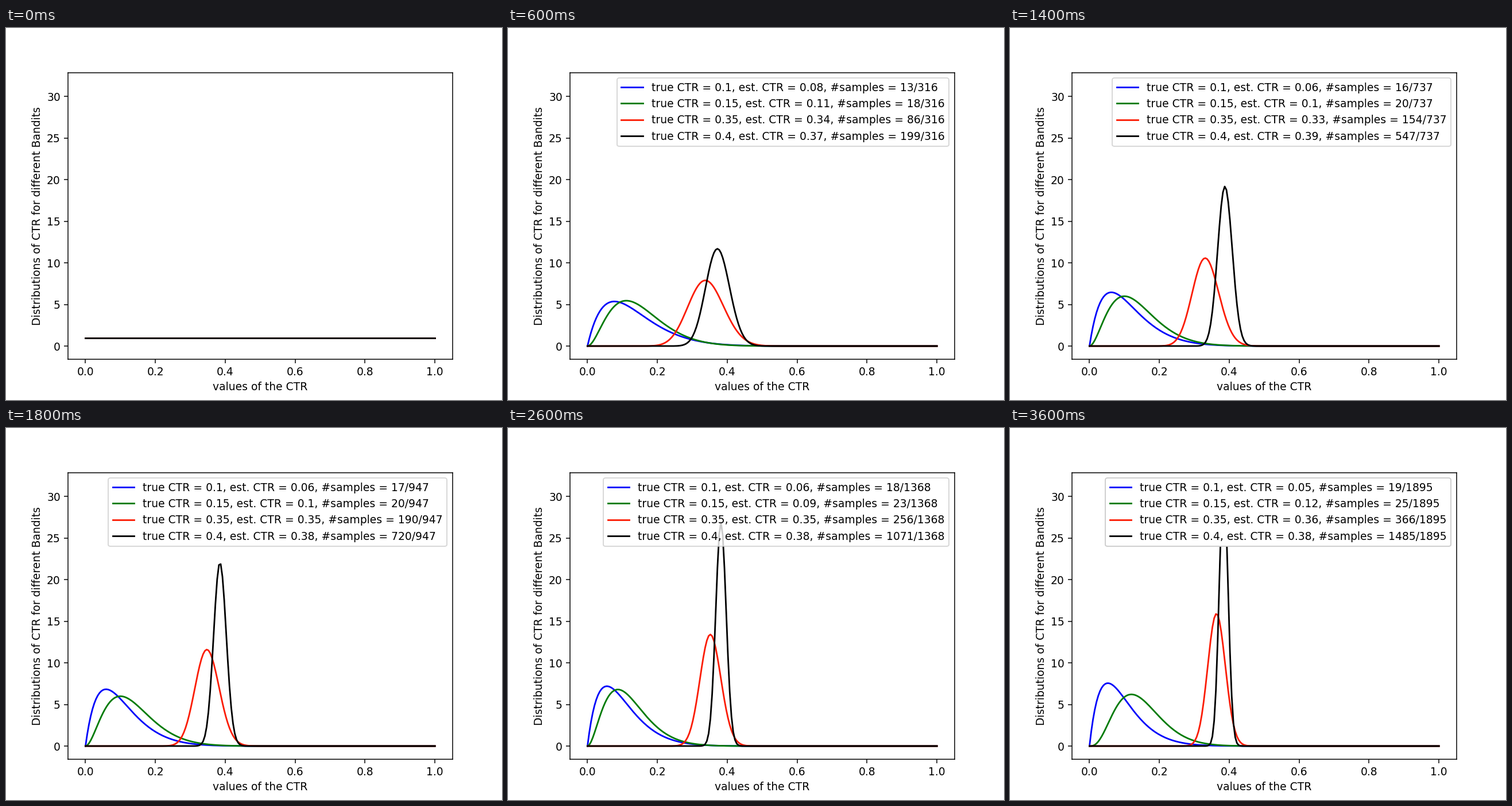
Write a matplotlib script that moves like this. It is 864x648 px and loops after 4000 ms.

```python
import math

import numpy as np
import matplotlib.pyplot as plt
from matplotlib.animation import FuncAnimation

STEP_MS = 200
SLOTS = 20
LAST = 18            # the final state holds for two slots
PEAK = 31.28
RATES = (0.1, 0.15, 0.35, 0.4)
COLORS = ("#0004fb", "#007b06", "#fb1c04", "black")

# Trials and clicks of the slow bandits, one value per step.
BLUE_N = (0, 9, 11, 13, 14, 15, 15, 16, 17, 17, 17, 17, 17, 18, 18, 18, 18, 18, 19)
GREEN_N = (0, 14, 16, 18, 19, 19, 20, 20, 20, 20, 20, 21, 22, 23, 23, 24, 24, 25, 25)

# Checkpoints of the two strong bandits.
KEYS = (0, 1, 2, 4, 7, 11, 15, 18)
RED_N = (0, 13, 50, 123, 154, 227, 284, 366)
RED_S = (0, 2, 16, 42, 51, 81, 100, 133)
BLACK_S = (0, 26, 50, 98, 212, 342, 476, 570)

x = np.linspace(0, 1, 200)
log_x = np.log(np.maximum(x, 1e-300))
log_1x = np.log(np.maximum(1 - x, 1e-300))


def at(step, values):
    return int(round(float(np.interp(step, KEYS, values))))


def counts(step):
    """Return (trials, clicks) for each bandit and the total of trials."""
    total = round(2000 * step / 19)
    blue = (BLUE_N[step], int(step > 1))
    green = (GREEN_N[step], 0 if step == 0 else 2 if step < 15 else 3)
    red = (at(step, RED_N), at(step, RED_S))
    black = (total - blue[0] - green[0] - red[0], at(step, BLACK_S))
    return (blue, green, red, black), total


def beta_pdf(n, s):
    norm = math.lgamma(n + 2) - math.lgamma(s + 1) - math.lgamma(n - s + 1)
    return np.exp(norm + s * log_x + (n - s) * log_1x)


fig, ax = plt.subplots(figsize=(6.4, 4.8), dpi=135)
ax.set_xlim(-0.05, 1.05)
ax.set_ylim(-0.05 * PEAK, 1.05 * PEAK)
ax.set_xlabel("values of the CTR")
ax.set_ylabel("Distributions of CTR for different Bandits")
lines = [ax.plot(x, np.ones_like(x), color=c, lw=1.5)[0] for c in COLORS]


def update(frame):
    step = min(frame, LAST)
    arms, total = counts(step)
    for line, rate, (n, s) in zip(lines, RATES, arms):
        line.set_ydata(beta_pdf(n, s))
        est = round(s / n, 2) if n else 0.0
        line.set_label(f"true CTR = {rate}, est. CTR = {est}, #samples = {n}/{total}")
    legend = ax.legend(loc="upper right")
    legend.set_visible(step > 0)
    if step == LAST:
        legend.get_frame().set_facecolor((1, 1, 1, 1))
        legend.get_frame().set_alpha(None)
    return lines


anim = FuncAnimation(fig, update, frames=SLOTS, interval=STEP_MS,
                     init_func=lambda: update(0), repeat=True, repeat_delay=0)
plt.show()
```
